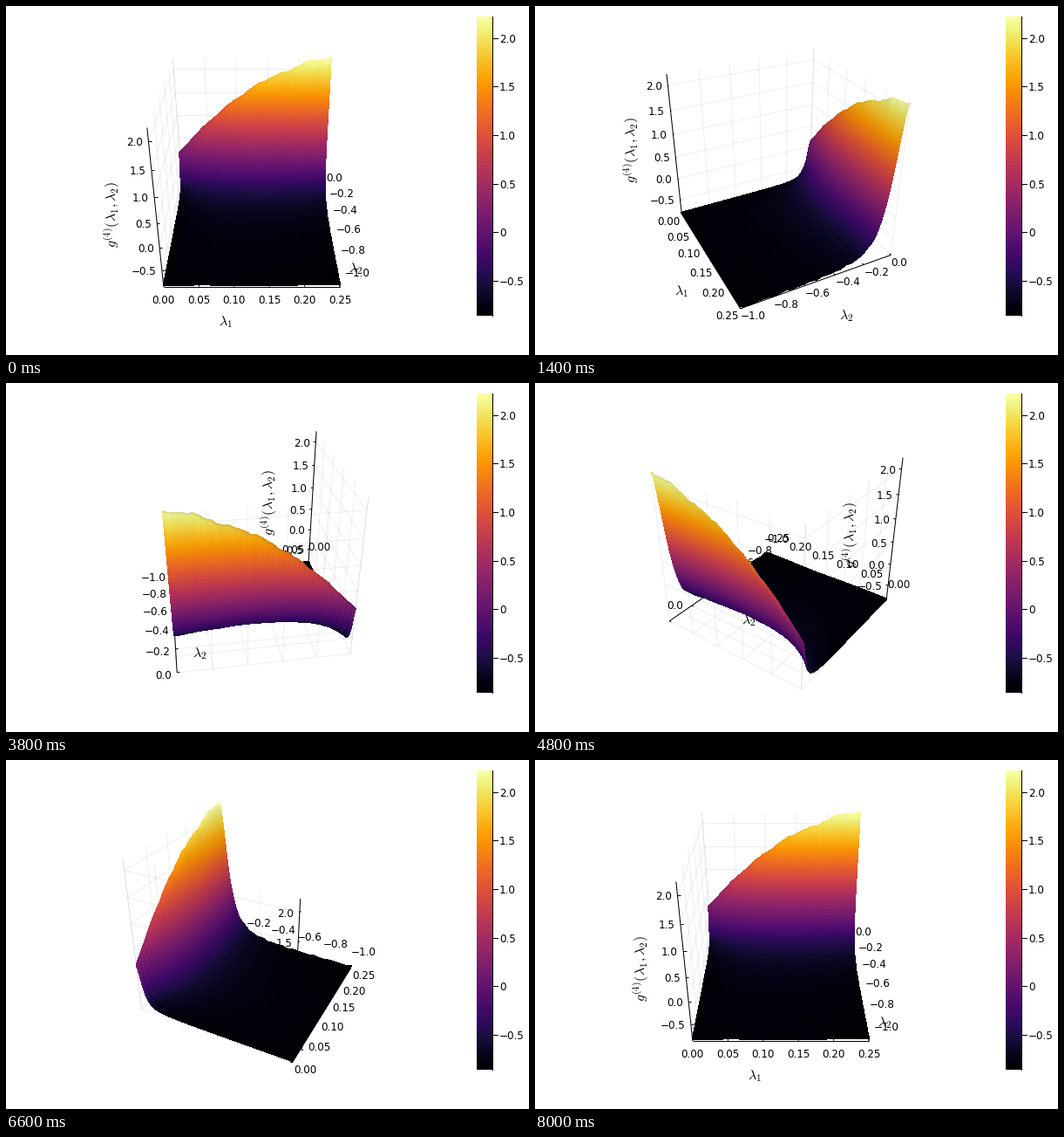
Animation of 600x400 px, one loop 8070 ms. Source, as a matplotlib script:

```python
import numpy as np
import matplotlib.pyplot as plt
from matplotlib.animation import FuncAnimation
from matplotlib.collections import LineCollection, PolyCollection

plt.rcParams["font.family"] = "DejaVu Sans"
plt.rcParams["mathtext.fontset"] = "cm"

STEPS, LOOP = 242, 8070           # two ticks per 3 degree turn
PX = 0.72                         # points per pixel at 100 dpi
CX, CY, HALF = 282, 183.5, 171.5  # view centre and half height
ELEV, FOV = np.radians(30), np.radians(30)
DIST = np.sqrt(3) / np.sin(FOV / 2)
FOCAL = HALF / np.tan(FOV / 2)
ZMIN, ZMAX = -0.859, 2.22


def norm(v, lo, hi):
    return 2 * (np.asarray(v, float) - lo) / (hi - lo) - 1


def view_dir(az):
    """Unit vector from the centre to the camera."""
    return np.array([np.sin(az) * np.cos(ELEV), -np.cos(az) * np.cos(ELEV),
                     np.sin(ELEV)])


def project(p, az):
    """Perspective view of points in the [-1, 1] cube; gives pixels and depth."""
    s, c = np.sin(az), np.cos(az)
    p = np.asarray(p, float)
    up = np.array([-s * np.sin(ELEV), c * np.sin(ELEV), np.cos(ELEV)])
    depth = DIST - p @ view_dir(az)
    x = CX + FOCAL * (p @ np.array([c, s, 0])) / depth
    y = CY - FOCAL * (p @ up) / depth
    return np.stack([x, y], -1), depth


def height(q, t):
    """Surface height in 0..1 for q = l1 / 0.25 and t = -l2."""
    ridge = 0.306 + 1.174 * q - 0.48 * q**2
    ridge = ridge * (1 + 0.007 * np.sin(37 * q + 1) + 0.005 * np.sin(83 * q))
    ridge = ridge - 0.018 * np.exp(-((q - 0.72) / 0.05) ** 2)
    width = 0.105 - 0.04 * q - 0.07 * np.exp(-q / 0.1)
    floor = 0.011 * (1 - 0.6 * q) + 0.012 * np.sin(np.pi * q) * (1 - t)
    rough = np.sin(47 * t + 5 * q) + np.sin(83 * t - 9 * q + 2)
    f = ridge / (1 + (t / width) ** 2) + floor
    return np.clip(f + 0.004 * q * rough * np.minimum(1, 6 * t), 0, 1)


def corners(a):
    return np.stack([a[:-1, :-1], a[1:, :-1], a[1:, 1:], a[:-1, 1:]], 2)


# surface mesh, denser near the steep ridge
q = np.linspace(0, 1, 37)
t = np.r_[0.07 * np.tan(np.linspace(0, np.arctan(0.25 / 0.07), 54)),
          np.linspace(0.25, 1, 20)[1:]]
Q, T = np.meshgrid(q, t, indexing="ij")
F = height(Q, T)
mesh = np.stack([2 * Q - 1, 1 - 2 * T, 2 * F - 1], -1)

quads = corners(mesh).reshape(-1, 4, 3)
quad_rgb = plt.cm.inferno(corners(F).mean(2).ravel())[:, :3]
normals = np.cross(quads[:, 2] - quads[:, 0], quads[:, 3] - quads[:, 1])
normals /= np.linalg.norm(normals, axis=1, keepdims=True)

# ticks, grid and axes in cube coordinates
xt = np.linspace(0, 0.25, 6)
yt = np.linspace(-1, 0, 6)
zt = np.linspace(-0.5, 2, 6)
xs, ys, zs = norm(xt, 0, 0.25), norm(yt, -1, 0), norm(zt, ZMIN, ZMAX)

grid = []
for x in xs:
    grid += [[(x, -1, -1), (x, 1, -1)], [(x, 1, -1), (x, 1, 1)]]
for y in ys:
    grid += [[(-1, y, -1), (1, y, -1)], [(-1, y, -1), (-1, y, 1)]]
for z in zs:
    grid += [[(-1, -1, z), (-1, 1, z)], [(-1, 1, z), (1, 1, z)]]

L = 0.03
lines = [[(-1, -1, -1), (1, -1, -1)], [(1, -1, -1), (1, 1, -1)],
         [(-1, -1, -1), (-1, -1, 1)]]
lines += [[(x, -1, -1), (x, -1 + L, -1)] for x in xs]
lines += [[(1, y, -1), (1 - L, y, -1)] for y in ys]
lines += [[(-1, -1, z), (-1 + L, -1, z)] for z in zs]

fig = plt.figure(figsize=(6, 4), dpi=100, facecolor="white")
ax = fig.add_axes([0, 0, 1, 1])
ax.axis("off")


def label(s, size=12, x=0, y=0, **kw):
    style = dict(fontsize=size * PX, va="center_baseline", zorder=3)
    return ax.text(x, y, s.replace("-", "\u2212"), **{**style, **kw})


# colour bar
ax.imshow(np.linspace(1, 0, 256)[:, None], cmap="inferno", aspect="auto",
          extent=(540, 558, 355, 12), interpolation="bilinear", zorder=1)
ax.set_xlim(0, 600)
ax.set_ylim(400, 0)
ax.plot([558, 558], [12, 355], color="black", lw=PX)
for v in zt:
    y = 355 - 343 * (v - ZMIN) / (ZMAX - ZMIN)
    ax.plot([558, 564], [y, y], color="black", lw=PX)
    label("0" if abs(v) < 1e-9 else f"{v:.1f}", x=566, y=y)

# moving parts
grid_art = LineCollection([], colors=[(0, 0, 0, 0.08)], linewidths=0.8 * PX, zorder=1)
axis_art = LineCollection([], colors="black", linewidths=PX, zorder=2)
surf = PolyCollection([], linewidths=0.8 * PX, antialiaseds=False, zorder=4)
for art in (grid_art, axis_art, surf):
    ax.add_collection(art, autolim=False)

xl = [label(f"{v:.2f}") for v in xt]
yl = [label(f"{v:.1f}" if v < -1e-9 else "0.0") for v in yt]
zl = [label("0.0" if abs(v) < 1e-9 else f"{v:.1f}", ha="right") for v in zt]

names = [
    (label(r"$\lambda_1$", 16, ha="center", va="center"), (0, -1, -1), (-30.5, 40.5)),
    (label(r"$\lambda_2$", 16, ha="center", va="center"), (1, 0, -1), (30, 41)),
    (label(r"$g^{(4)}(\lambda_1,\lambda_2)$", 16, ha="center", va="center",
           rotation=90), (-1, -1, 0), (-50, 1)),
]


def place(texts, pts, az, dx, dy, ha):
    pos, _ = project(pts, az)
    for txt, (x, y) in zip(texts, pos):
        txt.set_position((x + dx, y + dy))
        txt.set_ha(ha)


def draw(i):
    deg = 3 * ((i + 1) // 2) % 360
    az = np.radians(deg)
    s, c = np.sin(az), np.cos(az)

    grid_art.set_segments(project(grid, az)[0])
    axis_art.set_segments(project(lines, az)[0])

    # tick labels sit on the outer side of their axis
    side = "center" if deg == 0 else "right" if deg < 90 else "left"
    drop = 7 + 7 * c**4 if c > 1e-9 else -19
    place(xl, [(x, -1, -1) for x in xs], az, -2 * s, drop, side)

    k = c**4
    front = 0 < deg < 180
    side = "right" if front and c < 0 else "left"
    drop = 7.5 - 5.5 * k if front else -19.5 + 2.8 * k
    place(yl, [(1, y, -1) for y in ys], az, 6 * np.sign(c) * k, drop, side)

    place(zl, [(-1, -1, z) for z in zs], az, -6.5, 0, "right")

    for txt, p, off in names:
        txt.set_position(project(p, az)[0] + np.array(off))

    # far quads first, lit from the camera
    pix, depth = project(quads, az)
    order = np.argsort(-depth.mean(1))
    light = 0.84 + 0.16 * np.abs(normals @ view_dir(az))
    rgb = (quad_rgb * light[:, None])[order]
    surf.set_verts(pix[order])
    surf.set_facecolor(rgb)
    surf.set_edgecolor(rgb)
    return []


anim = FuncAnimation(fig, draw, frames=STEPS, interval=LOOP / STEPS,
                     init_func=lambda: draw(0), repeat=True, repeat_delay=0,
                     blit=False)
plt.show()
```
